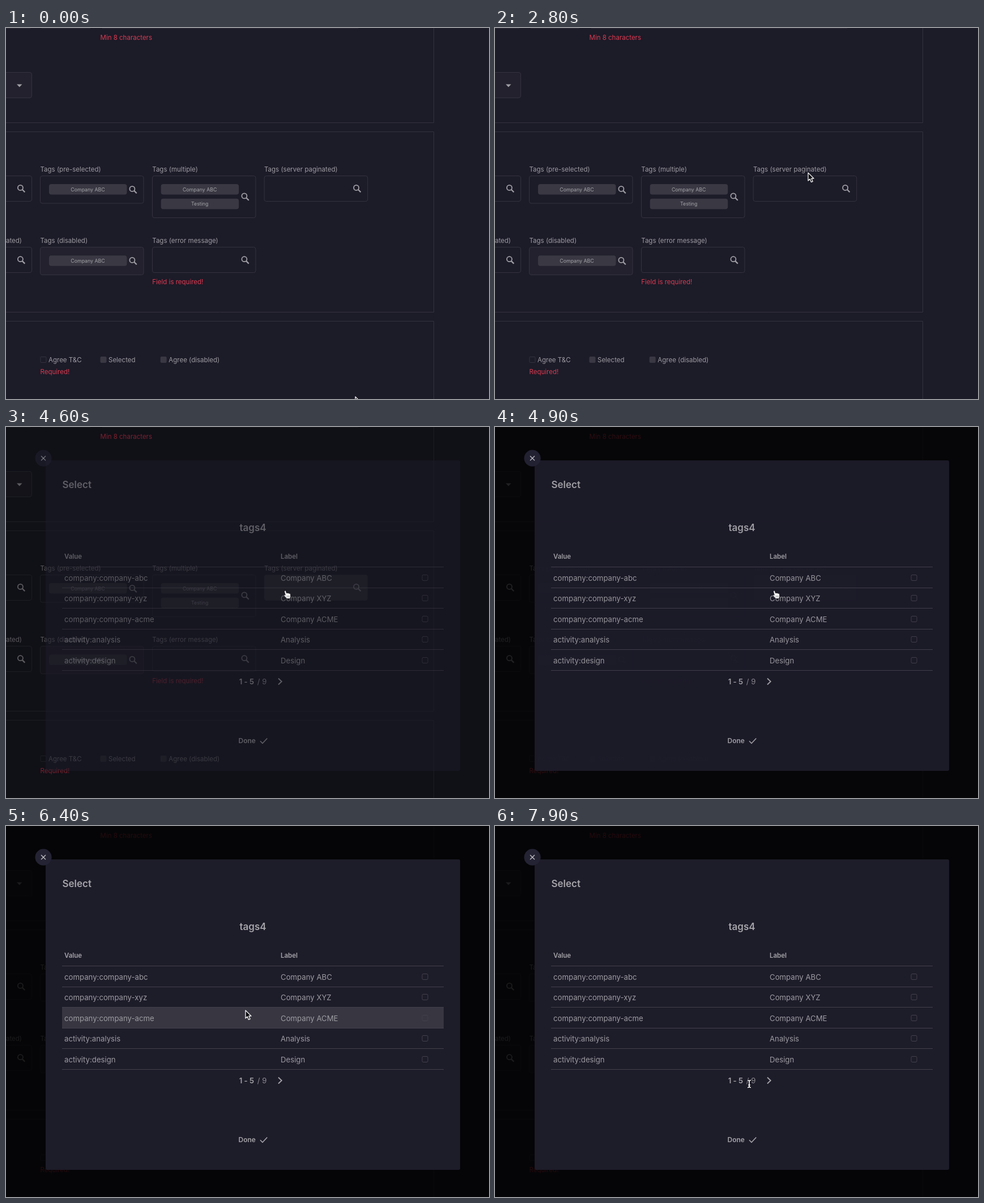
Recreate the animation shown at these times as an HTML page with a canvas. Size 853x656 px, loop 8000 ms.

```html
<!DOCTYPE html>
<html lang="en">
<head>
<meta charset="utf-8">
<title>Tag picker</title>
<style>
html, body { margin: 0; width: 100%; height: 100%; overflow: hidden; background: #1c1b28; }
canvas { display: block; width: 853px; height: 656px; }
</style>
</head>
<body>
<canvas id="stage" width="853" height="656"></canvas>
<script>
const ctx = document.getElementById('stage').getContext('2d');
const LOOP = 8000, STEP = 100;
const BG = '#1c1b28', LINE = '#33323e', TEXT = '#9d9ca2', RED = '#d93a50', PILL = '#393843';

// Pointer path: time, x, y
const PATH = [
  [0, 617, 652], [500, 617, 652], [600, 606, 626], [700, 560, 530], [800, 508, 432],
  [900, 493, 390], [1000, 501, 379], [1200, 501, 379], [2700, 553, 256], [2900, 553, 256],
  [3800, 491, 289], [6000, 491, 289], [6400, 423, 326], [6800, 423, 336], [7900, 449, 456]
];

const ROWS = [
  ['company:company-abc', 'Company ABC'],
  ['company:company-xyz', 'Company XYZ'],
  ['company:company-acme', 'Company ACME'],
  ['activity:analysis', 'Analysis'],
  ['activity:design', 'Design']
];
const ROW_TOP = 247.5, ROW_H = 36.6;

function pointerAt(t) {
  const i = PATH.findIndex(p => p[0] > t);
  if (i < 0) return PATH[PATH.length - 1].slice(1);
  const [t0, x0, y0] = PATH[i - 1], [t1, x1, y1] = PATH[i];
  let k = (t - t0) / (t1 - t0);
  if (t1 - t0 > 200) k = k * k * (3 - 2 * k);
  return [x0 + (x1 - x0) * k, y0 + (y1 - y0) * k];
}

function text(str, x, y, size = 11.5, color = TEXT, weight = 400, align = 'left') {
  ctx.font = `${weight} ${size}px Inter, sans-serif`;
  ctx.textAlign = align;
  ctx.fillStyle = color;
  ctx.fillText(str, x, y);
}

function box(x, y, w, h, r, fill, stroke) {
  ctx.beginPath();
  ctx.roundRect(x, y, w, h, r);
  if (fill) { ctx.fillStyle = fill; ctx.fill(); }
  if (stroke) { ctx.strokeStyle = stroke; ctx.lineWidth = 1; ctx.stroke(); }
}

function lines(color, width, ...points) {
  ctx.beginPath();
  points.forEach(([x, y]) => ctx.lineTo(x, y));
  ctx.strokeStyle = color;
  ctx.lineWidth = width;
  ctx.stroke();
}

function magnifier(x, y) {
  ctx.beginPath();
  ctx.arc(x - 1.6, y - 1.6, 4.5, 0, 7);
  ctx.strokeStyle = '#a09fa5';
  ctx.lineWidth = 1.8;
  ctx.stroke();
  lines('#a09fa5', 2.2, [x + 1.8, y + 1.8], [x + 6.3, y + 6.3]);
}

function field(x, y, h, iconY, fill) {
  box(x, y, 182.5, h, 3.5, fill, LINE);
  magnifier(x + 164, iconY);
}

function pill(str, x, y) {
  box(x, y, 137.5, 18.5, 4, PILL);
  text(str, x + 68.5, y + 12.6, 8.8, '#a5a4a9', 400, 'center');
}

function drawPage(hot) {
  ctx.fillStyle = BG;
  ctx.fillRect(0, 0, 853, 656);

  lines(LINE, 1, [-9, 167.5], [755.5, 167.5], [755.5, -9]);
  box(-9.5, 183.5, 765, 319, 0, null, LINE);
  box(-9.5, 518.5, 765, 200, 0, null, LINE);
  for (const [a, b] of [[0, 43], [63, 149], [170, 622]]) lines('#2c2b37', 1, [a, 0.5], [b, 0.5]);

  text('Min 8 characters', 166.5, 21, 11.5, RED);
  box(-137, 78.5, 182.5, 45, 3.5, '#22212d', LINE);
  ctx.beginPath();
  ctx.moveTo(19, 99.5);
  ctx.lineTo(28.5, 99.5);
  ctx.lineTo(23.75, 104.5);
  ctx.fillStyle = '#a09fa5';
  ctx.fill();

  text('Tags (pre-selected)', 60.5, 254);
  text('Tags (multiple)', 258.3, 254);
  text('Tags (server paginated)', 456, 254);
  field(-137, 261.5, 45, 284);
  field(60.5, 261.5, 48.5, 286);
  field(258.5, 261.5, 74, 298.5);
  field(456.2, 261.5, 45, 284, hot && '#3a3943');
  pill('Company ABC', 76, 276);
  pill('Company ABC', 273.7, 276);
  pill('Testing', 273.7, 301.7);

  text('ated)', 28, 380, 11.5, TEXT, 400, 'right');
  text('Tags (disabled)', 60.5, 380);
  text('Tags (error message)', 258.3, 380);
  field(-137, 387.5, 45, 410.3);
  field(60.5, 387.5, 49, 412, '#22212d');
  field(258.5, 387.5, 45, 410.3);
  pill('Company ABC', 76, 402.3);
  text('Field is required!', 258.3, 453, 11.5, RED);

  box(61, 581.5, 10, 10, 1, null, LINE);
  box(166.5, 581, 11, 11, 2, PILL);
  box(272.7, 581, 11, 11, 2, PILL);
  text('Agree T&C', 75, 590.5);
  text('Selected', 181, 590.5);
  text('Agree (disabled)', 287.3, 590.5);
  text('Required!', 60.5, 612, 11.5, RED);
}

function drawDialog(alpha, hotRow) {
  ctx.globalAlpha = alpha;
  ctx.fillStyle = 'rgba(0, 0, 0, .83)';
  ctx.fillRect(0, 0, 853, 656);
  box(70, 59, 732, 549, 3, '#1d1c29');
  ctx.beginPath();
  ctx.arc(66, 55.2, 14.6, 0, 7);
  ctx.fillStyle = '#242334';
  ctx.fill();
  lines('#bcbbc0', 1.4, [62, 51.2], [70, 59.2]);
  lines('#bcbbc0', 1.4, [70, 51.2], [62, 59.2]);

  text('Select', 99.5, 108, 17, '#a5a4a9', 600);
  text('tags4', 436, 184.3, 17, '#a5a4a9', 600, 'center');
  text('Value', 103, 232.5, 11.5, '#a5a4a9', 600);
  text('Label', 485, 232.5, 11.5, '#a5a4a9', 600);

  if (ROWS[hotRow]) {
    ctx.fillStyle = '#373641';
    ctx.fillRect(99, ROW_TOP + hotRow * ROW_H, 674, ROW_H);
  }
  for (let i = 0; i <= ROWS.length; i++) {
    const y = Math.floor(ROW_TOP + i * ROW_H) + 0.5;
    lines('#42414b', 1, [99, y], [773, y]);
  }
  ROWS.forEach(([value, label], i) => {
    const y = ROW_TOP + i * ROW_H;
    text(value, 103, y + 24, 13.2);
    text(label, 485, y + 24, 13.2);
    box(735, Math.round(y + 13) + 0.5, 10, 10, 2, null, '#42414b');
  });

  text('1 - 5', 411.7, 454.7, 13.2, '#a5a4a9', 600);
  text('/ 9', 460.5, 454.7, 13.2, '#8c8b92', 400, 'right');
  lines('#a5a4a9', 1.8, [481, 444.5], [486.8, 450], [481, 455.5]);
  text('Done', 410.5, 559.2, 12, '#a5a4a9', 600);
  lines('#a5a4a9', 1.6, [449, 555.3], [453, 559.3], [461.3, 550.5]);
  ctx.globalAlpha = 1;
}

const ARROW = new Path2D('M0 0V14L3.2 11L5.5 16.4L8.1 15.3L5.8 10H10Z');
const HAND = new Path2D('M1 .8C2 -.3 3.2 .4 3.6 1.8L4.6 5C5 4 6.5 4 7 5C8 4.3 9 4.7 9.4 5.6C10.5 5.1 11.3 5.7 11.5 7L11.7 10.5L10.7 14.5H4.8L.4 9.6C-.8 8 .8 7 2.3 8.3L.7 2.5Z');
const IBEAM = new Path2D('M-3 -6.5Q0 -6.5 0 -4V4Q0 6.5 -3 6.5M3 -6.5Q0 -6.5 0 -4V4Q0 6.5 3 6.5M-2 2H2');

function drawPointer(kind, x, y) {
  ctx.save();
  ctx.translate(x, y);
  ctx.lineJoin = 'round';
  if (kind === 'text') {
    ctx.strokeStyle = '#15141c';
    ctx.lineWidth = 3.4;
    ctx.stroke(IBEAM);
    ctx.strokeStyle = '#f2f2f2';
    ctx.lineWidth = 1.7;
    ctx.stroke(IBEAM);
  } else {
    const hand = kind === 'hand';
    ctx.fillStyle = hand ? '#f2f2f2' : '#0c0c10';
    ctx.strokeStyle = hand ? '#15141c' : '#f2f2f2';
    ctx.lineWidth = hand ? 0.8 : 1.3;
    const shape = hand ? HAND : ARROW;
    ctx.fill(shape);
    ctx.stroke(shape);
    if (hand) for (const fx of [5.2, 7.2, 9.1]) lines('#77767c', 0.6, [fx, 9], [fx + 0.2, 12.3]);
  }
  ctx.restore();
}

function draw(t) {
  const [x, y] = pointerAt(t);
  const overField = t < 6100 && x > 456 && x < 639 && y > 261 && y < 307;
  const fade = Math.min(1, Math.max(0, (t - 4450) / 700));
  const hotRow = t >= 6100 ? Math.floor((y - ROW_TOP) / ROW_H) : -1;
  const overPager = t >= 6100 && y > 440 && x > 410 && x < 462;

  drawPage(overField);
  if (fade) drawDialog(1 - (1 - fade) ** 3, hotRow);
  drawPointer(overField ? 'hand' : overPager ? 'text' : 'arrow', x, y);
}

function tick() {
  const t = performance.now() % LOOP;
  draw(Math.floor(t / STEP) * STEP);
  requestAnimationFrame(tick);
}
tick();
</script>
</body>
</html>
```
